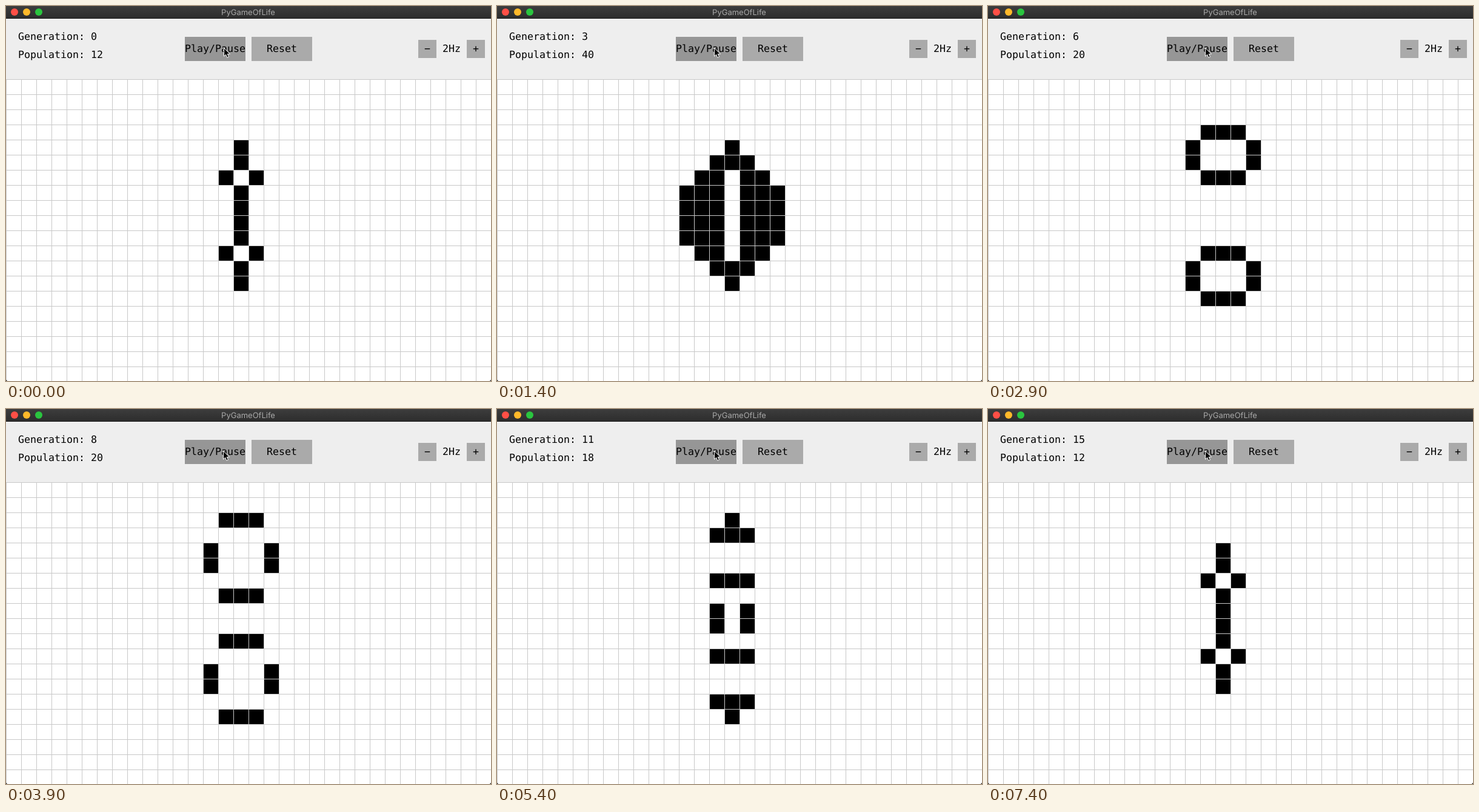
These frames come from a looping animation (800x620 px, 7800 ms). An HTML page:

```html
<!DOCTYPE html>
<html lang="en">
<head>
<meta charset="utf-8">
<title>PyGameOfLife</title>
<style>
  html, body { margin: 0; width: 100%; height: 100%; overflow: hidden; background: #000; }
  svg { display: block; width: 800px; height: 620px; }
  text { font: 16.61px "DejaVu Sans Mono", monospace; text-rendering: geometricPrecision; white-space: pre; }
  .title { font: 13px Inter, Roboto, sans-serif; fill: #a9a9a9; text-anchor: middle; }
  .crisp { shape-rendering: crispEdges; }
</style>
</head>
<body>
<svg viewBox="0 0 800 620">
  <defs>
    <linearGradient id="bar" x1="0" y1="0" x2="0" y2="1">
      <stop offset="0" stop-color="#3d3d3d"/>
      <stop offset="1" stop-color="#2c2c2c"/>
    </linearGradient>
  </defs>
  <rect class="crisp" width="800" height="21" fill="url(#bar)"/>
  <rect class="crisp" y="20" width="800" height="1" fill="#1c1c1c"/>
  <circle cx="14" cy="10" r="6" fill="#ff4f46"/>
  <circle cx="34" cy="10" r="6" fill="#ffb92a"/>
  <circle cx="54" cy="10" r="6" fill="#2ac53f"/>
  <text class="title" x="399.5" y="15">PyGameOfLife</text>

  <g class="crisp">
    <rect y="21" width="800" height="100" fill="#eee"/>
    <rect y="121" width="800" height="499" fill="#fff"/>
    <path id="cells"/>
    <path id="grid" fill="none" stroke="#c8c8c8"/>
    <rect x="295" y="51" width="100" height="40" fill="#969696"/>
    <path d="M405 51h100v40h-100zM680 56h30v30h-30zM760 56h30v30h-30z" fill="#aaa"/>
  </g>

  <text id="gen" x="20" y="56"></text>
  <text id="pop" x="20" y="86"></text>
  <text x="295" y="76">Play/Pause</text>
  <text x="430" y="76">Reset</text>
  <text x="690" y="76">−</text>
  <text x="720" y="76">2Hz</text>
  <text x="770" y="76">+</text>

  <path d="M0 617.5Q.5 619.5 2.5 620H0zM800 617.5Q799.5 619.5 797.5 620H800z"/>
  <path id="cursor" d="M0 0V13.6L3.1 10.7L5.4 15.8L7.9 14.7L5.7 9.8H10Z"
        stroke="#fff" stroke-linejoin="round"/>
</svg>
<script>
  const COLS = 32, ROWS = 20, SIZE = 25, TOP = 121;
  const LOOP = 7800, STEP = 500, FIRST = 400, LAST_GEN = 15;
  const el = id => document.getElementById(id);

  function nextGen(cells) {
    const alive = new Set(cells.map(String)), next = [];
    for (let y = 0; y < ROWS; y++) {
      for (let x = 0; x < COLS; x++) {
        let near = 0;
        for (let dy = -1; dy <= 1; dy++) {
          for (let dx = -1; dx <= 1; dx++) {
            if ((dx || dy) && alive.has(`${x + dx},${y + dy}`)) near++;
          }
        }
        if (near === 3 || (near === 2 && alive.has(`${x},${y}`))) next.push([x, y]);
      }
    }
    return next;
  }

  // A row of ten, with the third cell from each end split sideways.
  const seed = [];
  for (let y = 4; y < 14; y++) {
    if (y === 6 || y === 11) seed.push([14, y], [16, y]);
    else seed.push([15, y]);
  }
  const history = [seed];
  while (history.length <= LAST_GEN) history.push(nextGen(history.at(-1)));

  let lines = "";
  for (let x = 0; x < COLS; x++) lines += `M${x * SIZE + 0.5} ${TOP}V620`;
  for (let y = 0; y < ROWS; y++) lines += `M0 ${TOP + y * SIZE + 0.5}H800`;
  el("grid").setAttribute("d", lines);

  let shown = -1;
  function showGen(n) {
    if (n === shown) return;
    shown = n;
    const cells = history[n];
    el("cells").setAttribute("d", cells.map(([x, y]) =>
      `M${x * SIZE + 1} ${TOP + y * SIZE + 1}h24v24h-24z`).join(""));
    el("gen").textContent = `Generation: ${n}`;
    el("pop").textContent = `Population: ${cells.length}`;
  }

  function draw(ms) {
    const t = ms % LOOP;
    showGen(t < FIRST ? 0 : Math.min(LAST_GEN, 1 + Math.floor((t - FIRST) / STEP)));
    el("cursor").setAttribute("transform", `translate(${t < 100 ? 359.5 : 358.5} 69.5)`);
  }

  const start = performance.now();
  function tick() {
    draw(performance.now() - start);
    requestAnimationFrame(tick);
  }
  tick();
</script>
</body>
</html>
```
